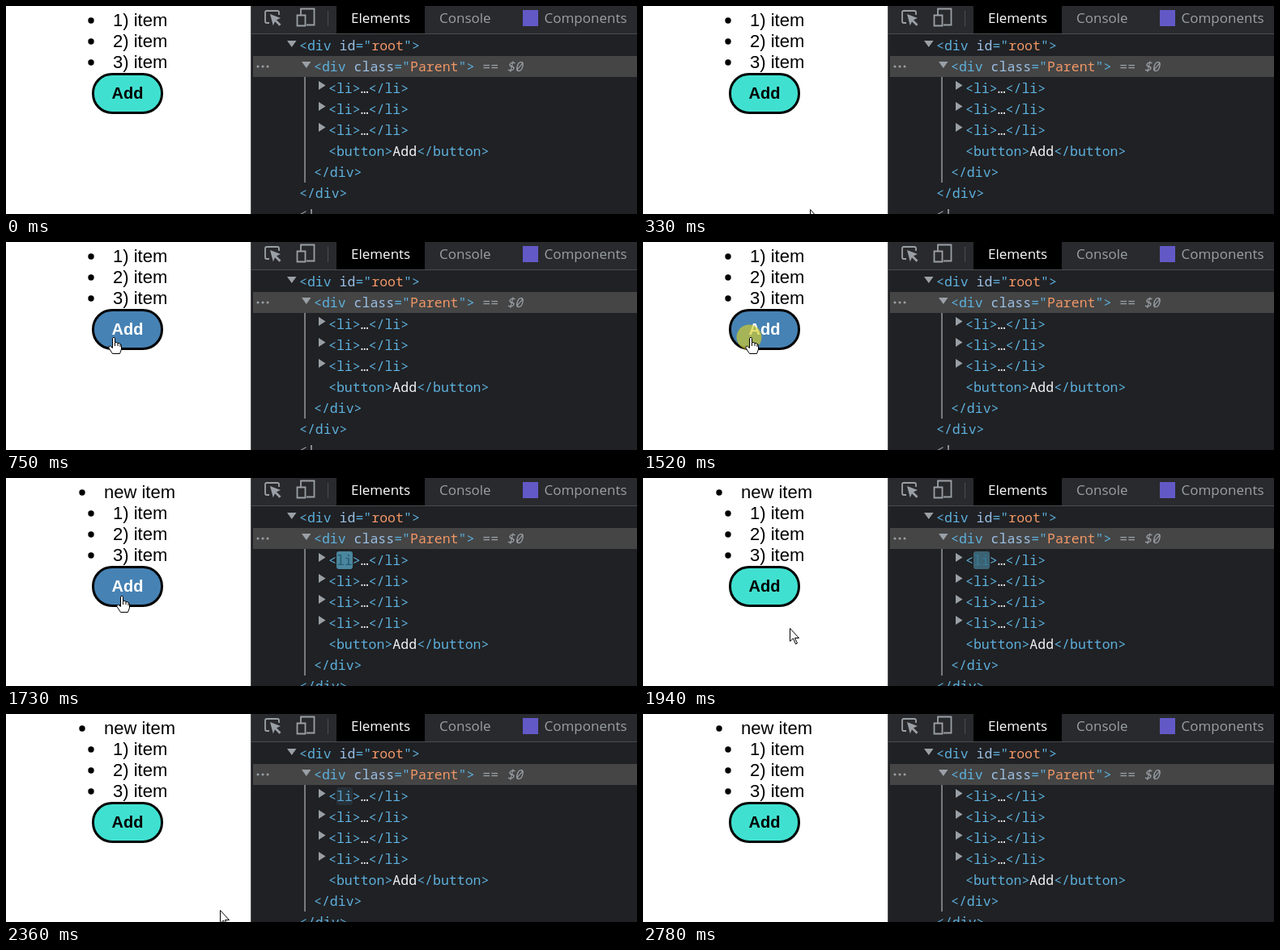
These frames come from a looping animation (779x258 px, 3260 ms). An HTML page:

```html
<!DOCTYPE html>
<html lang="en">
<head>
<meta charset="utf-8">
<title>Adding a list item</title>
<style>
  html, body { margin: 0; width: 100%; height: 100%; overflow: hidden; background: #fff; }
  svg { display: block; }
  text { white-space: pre; }
  .page { font: 22px "Liberation Sans", Arial, sans-serif; }
  .label { font: bold 20px "Liberation Sans", Arial, sans-serif; }
  .tab { font: 17px "Open Sans", sans-serif; fill: #9aa0a6; }
  .code { font: 16.55px "Noto Sans Mono", monospace; fill: #5db0dd; }
  .name { fill: #9bc0e6; }
  .value { fill: #f29766; }
  .plain { fill: #f1f3f4; }
  .muted { fill: #9aa0a6; }
  .icon { fill: none; stroke: #9aa0a6; stroke-width: 1.8; }
  .cursor { fill: #fff; stroke: #000; stroke-linejoin: round; }
</style>
</head>
<body>
<svg id="stage" width="779" height="258" viewBox="0 0 779 258"></svg>
<script>
const LOOP = 3260, FIRST = 330, STEP = 70, LAST = 2780;
const PRESS = 1520, ADDED = 1590, FADE = 1400, ROW = 26;

// Pointer path: time, x, y
const path = [[330, 206, 252], [540, 158, 197], [750, 133, 118], [1590, 133, 118],
  [1730, 143, 146], [2150, 218, 226], [2360, 264, 243], [2500, 286, 262]];

const span = (cls, text) => `<tspan class="${cls}">${text}</tspan>`;
const code = (x, y, body) => `<text class="code" x="${x}" y="${y}">${body}</text>`;
const tab = (x, text, fill = '#9aa0a6') =>
  `<text class="tab" x="${x}" y="21" style="fill:${fill}">${text}</text>`;
const item = (x, y, text) =>
  `<circle cx="${x - 27}" cy="${y - 7}" r="3.7"/><text class="page" x="${x}" y="${y}">${text}</text>`;
const openTag = (attr, value) =>
  `&lt;div ${span('name', attr)}="${span('value', value)}"&gt;`;
const downArrow = (x, y) => `<path class="muted" d="M${x} ${y}h11.500l-5.750 8z"/>`;
const listRow = (y, id = '') =>
  `<path class="muted" d="M386 ${y - 15}v11l8.500-5.500z"/>` +
  code(398, y, `&lt;<tspan id="${id || 'li' + y}">li</tspan>&gt;${span('plain', '…')}&lt;/li&gt;`);

document.getElementById('stage').innerHTML = `
  <rect width="779" height="258" fill="#fff"/>
  <g id="fresh">${item(121, 25, 'new item')}</g>
  <g id="pageRest">
    ${[1, 2, 3].map(n => item(132, ROW * n - 1, n + ') item')).join('')}
    <rect id="button" x="107.5" y="84.5" width="85" height="48" rx="23.5" stroke="#000" stroke-width="3"/>
    <text id="label" class="label" x="130.5" y="115">Add</text>
  </g>

  <rect x="302" width="477" height="258" fill="#494c50"/>
  <rect x="303" width="476" height="258" fill="#202124"/>
  <rect x="303" width="476" height="34" fill="#292a2d"/>
  <rect x="303" y="34" width="476" height="1" fill="#494c50"/>
  <rect x="408" width="109" height="34" fill="#000"/>
  <path class="icon" d="M325 21h-3q-2 0-2-2V8q0-2 2-2h13q2 0 2 2v3"/>
  <path class="muted" d="M326 10l13 5-5 2.200 5.500 5.500-2 2-5.500-5.500-2.200 5z"/>
  <path class="icon" d="M364 11V3.500h16.500v20H371M359.500 11.500h10v13h-10z"/>
  <path d="M397.500 6v19" stroke="#494c50"/>
  ${tab(426, 'Elements', '#fff')}${tab(535, 'Console')}${tab(664.5, 'Components')}
  <rect x="638" y="5" width="19" height="20" fill="#6259c6"/>

  <rect x="305" y="62" width="474" height="26" fill="#454545"/>
  ${[311, 317, 323].map(x => `<circle class="muted" cx="${x}" cy="75" r="1.5"/>`).join('')}
  ${downArrow(347, 43)}${code(362, 55, openTag('id', 'root'))}
  ${downArrow(365, 69)}${code(380, 81, openTag('class', 'Parent') +
    `<tspan class="muted"> == <tspan font-style="italic">$0</tspan></tspan>`)}
  <rect id="guide" x="368" y="88" width="2" fill="#777b80"/>
  <rect id="flash" x="408" y="91" width="20" height="22" rx="3" fill="#4e91aa"/>
  ${listRow(108, 'newLi')}${listRow(134)}${listRow(160)}
  <g id="extraRow">${listRow(186)}</g>
  <g id="treeRest">
    ${code(398, 186, `&lt;button&gt;${span('plain', 'Add')}&lt;/button&gt;`)}
    ${code(380, 212, '&lt;/div&gt;')}
    ${code(362, 238, '&lt;/div&gt;')}
    ${code(362, 264, span('muted', '&lt;!--'))}
  </g>

  <circle id="press" r="15.5" cx="131" cy="118" fill="#d6cf28" opacity=".66"/>
  <path id="arrow" class="cursor" d="M.5 .5V16.500L4.500 13 7.500 20 9.500 19 6.500 12.500H11.500Z"/>
  <path id="hand" class="cursor" d="M-1.500 1.500Q-1.500 .5 0 .5T1.500 1.500V6.500Q4.500 6.200 5 7.500
    Q7.500 7.300 8 8.500Q9.500 8.800 9.500 10.500V15L7.500 20.500H-1.500L-6 13.500Q-6.500 11-4.500 11L-1.500 13.500Z
    M1.500 7v4M5 8v3M8 9v3"/>`;

const $ = id => document.getElementById(id);
const set = (id, attrs) => {
  for (const key in attrs) $(id).setAttribute(key, attrs[key]);
};
const show = (id, on) => set(id, { visibility: on ? 'visible' : 'hidden' });
const mix = (a, b, k) => a + (b - a) * k;

function pointerAt(t) {
  const next = path.findIndex(p => p[0] > t);
  if (next < 1) return null;
  const [t0, x0, y0] = path[next - 1], [t1, x1, y1] = path[next];
  const k = (t - t0) / (t1 - t0);
  return { x: Math.round(mix(x0, x1, k)), y: Math.round(mix(y0, y1, k)) };
}

// The CSS "ease" curve, solved by bisection
function ease(p) {
  let lo = 0, hi = 1;
  for (let i = 0; i < 20; i++) {
    const u = (lo + hi) / 2, v = 1 - u;
    if (.75 * v * v * u + .75 * v * u * u + u ** 3 < p) lo = u; else hi = u;
  }
  return .3 * (1 - lo) ** 2 * lo + 3 * (1 - lo) * lo * lo + lo ** 3;
}

function draw(time) {
  const t = time < FIRST ? 0 : Math.min(LAST, FIRST + Math.floor((time - FIRST) / STEP) * STEP);
  const added = t >= ADDED, shift = added ? ROW : 0;
  const pointer = pointerAt(t);
  const hover = !!pointer && pointer.x > 106 && pointer.x < 194 &&
    pointer.y > 83 + shift && pointer.y < 134 + shift;

  show('fresh', added);
  show('extraRow', added);
  set('pageRest', { transform: `translate(0 ${shift})` });
  set('treeRest', { transform: `translate(0 ${shift})` });
  set('guide', { height: 131 + shift });
  set('button', { fill: hover ? '#4682b4' : '#40e0d0' });
  set('label', { fill: hover ? '#fff' : '#000' });

  const glow = added && t < LAST ? 1 - ease((t - ADDED) / FADE) : 0;
  set('flash', { opacity: glow });
  set('newLi', { fill: `rgb(${mix(93, 32, glow)},${mix(176, 82, glow)},${mix(221, 103, glow)})` });

  show('press', t >= PRESS && t < ADDED);
  show('arrow', pointer && !hover);
  show('hand', hover);
  if (pointer) set(hover ? 'hand' : 'arrow', { transform: `translate(${pointer.x} ${pointer.y})` });
}

function tick() {
  draw(performance.now() % LOOP);
  requestAnimationFrame(tick);
}
tick();
</script>
</body>
</html>
```
